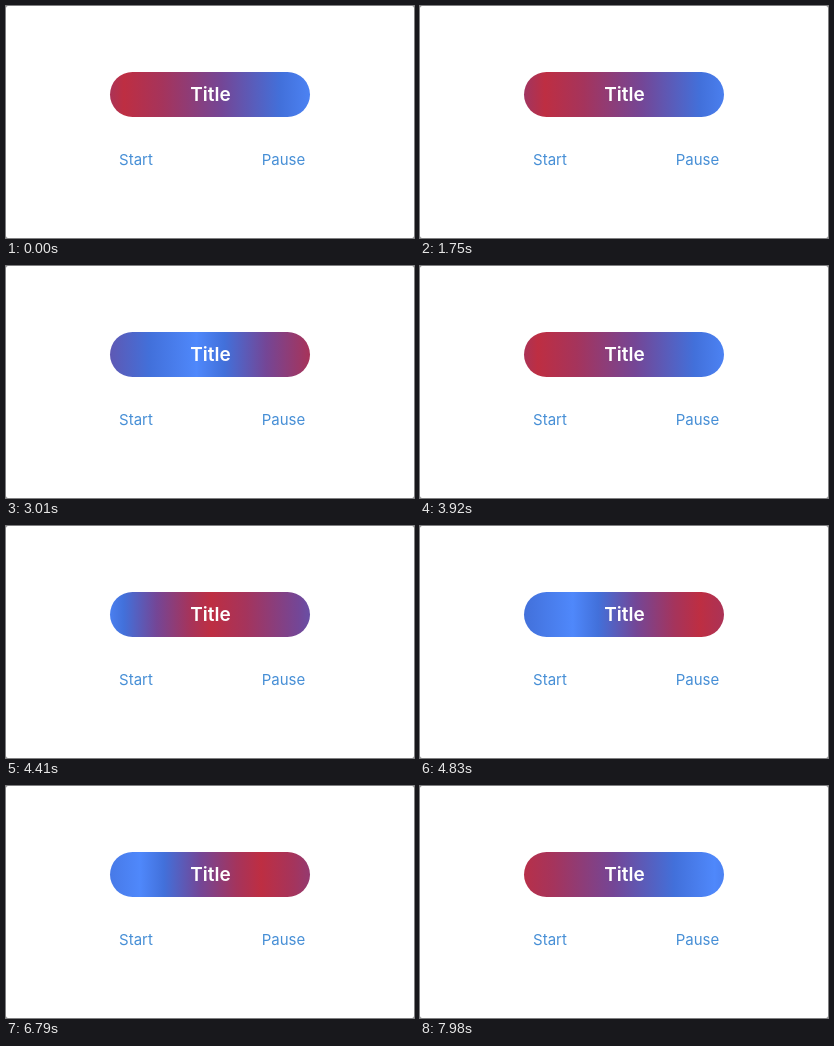
These frames come from a looping animation (408x232 px, 8 s). An HTML page:

```html
<!DOCTYPE html>
<html lang="en">
<head>
<meta charset="utf-8">
<title>Animated gradient button</title>
<style>
  html, body { margin: 0; width: 100%; height: 100%; overflow: hidden; background: #777; }
  #stage { position: relative; width: 408px; height: 232px; background: #fff; border-radius: 2px; }
  #pill { position: absolute; left: 104px; top: 65.5px; width: 200px; height: 45px; border-radius: 22.5px; }
  svg { position: absolute; inset: 0; }
  text { font: 400 15px Inter, sans-serif; fill: #478fd6; text-anchor: middle; }
  text.title { font-size: 19px; font-weight: 600; fill: #fff; }
</style>
</head>
<body>
<div id="stage">
  <div id="pill"></div>
  <svg width="408" height="232">
    <text class="title" x="204.5" y="94.5">Title</text>
    <text x="130" y="158.5">Start</text>
    <text x="277.5" y="158.5">Pause</text>
  </svg>
</div>
<script>
const LOOP = 8000, STEP = 70, CYCLE = 2100;
const START = 1540, FULL_SPEED = 2100, REST_PHASE = 1470;
const pill = document.getElementById('pill');

// Colours from a red crest to a blue crest
const ramp = [
  [0, '#be2e42'], [0.2, '#a5345c'], [0.5, '#744696'],
  [0.8, '#4270da'], [1, '#4f88fb']
];

// Crest positions inside the pill, in pixels
const redAt = p => 126 + 0.178 * p;
const blueAt = p => 11 + 0.135 * p;

function phaseAt(t) {
  const run = Math.max(0, t - START), spinUp = FULL_SPEED - START;
  const moved = run < spinUp ? run * run / (2 * spinUp) : run - spinUp / 2;
  return (REST_PHASE + moved) % CYCLE;
}

function gradient(phase) {
  const stops = [];
  const add = (red, blue, colours) => {
    for (const [f, c] of colours) stops.push(`${c} ${(red + (blue - red) * f).toFixed(2)}px`);
  };
  for (let k = -2; k <= 1; k++) {
    const p = phase + k * CYCLE;
    add(redAt(p), blueAt(p), [...ramp].reverse());
    add(redAt(p), blueAt(p + CYCLE), ramp);
  }
  return `linear-gradient(90deg, ${stops.join(', ')})`;
}

function draw() {
  const t = performance.now() % LOOP;
  pill.style.background = gradient(phaseAt(Math.floor(t / STEP) * STEP));
  requestAnimationFrame(draw);
}
draw();
</script>
</body>
</html>
```
